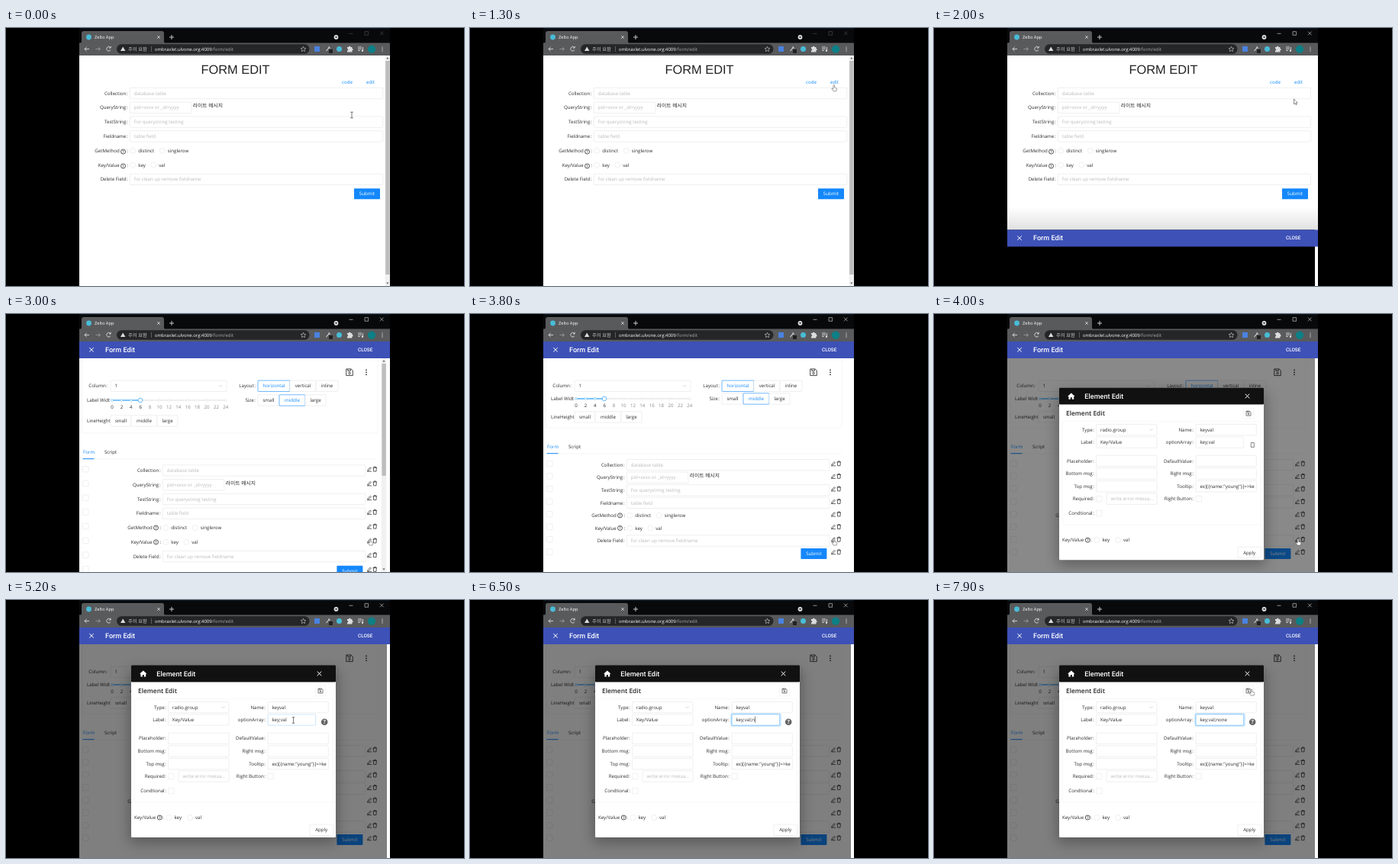
Write an HTML page that moves like this. It is 600x338 px and loops after 8 s.

```html
<!DOCTYPE html>
<html lang="en">
<head>
<meta charset="utf-8">
<title>Form editor</title>
<style>
  html, body { margin: 0; width: 100%; height: 100%; overflow: hidden; background: #000; }
  svg { display: block; width: 600px; height: 338px; }
  text { font-family: "Open Sans", "Noto Sans CJK KR", "Noto Sans CJK", sans-serif; white-space: pre; text-rendering: geometricPrecision; }
  .roboto { font-family: Roboto, sans-serif; font-weight: 500; }
  .arial { font-family: "Liberation Sans", Arial, sans-serif; }
</style>
</head>
<body>
<svg id="stage" viewBox="0 0 600 338"></svg>
<script>
const LOOP = 8000, STEP = 100;
const BLUE = '#1488fb', INK = '#2b2b2b', HINT = '#b9b9b9', EDGE = '#e4e4e4', BAR = '#3d51b7';

// Drawing helpers: y is the vertical centre of the text line.
const text = (x, y, s, { fill = INK, size = 6.15, anchor = 'start', cls = '', extra = '' } = {}) =>
  `<text x="${x}" y="${y + size * 0.355}" fill="${fill}" font-size="${size}" text-anchor="${anchor}" class="${cls}" ${extra}>${s}</text>`;
const rect = (x, y, w, h, fill, extra = '') =>
  `<rect x="${x}" y="${y}" width="${w}" height="${h}" fill="${fill}" ${extra}/>`;
const stroke = (d, color, width = 0.8, extra = '') =>
  `<path d="${d}" fill="none" stroke="${color}" stroke-width="${width}" ${extra}/>`;
const circle = (x, y, r, fill, extra = '') =>
  `<circle cx="${x}" cy="${y}" r="${r}" fill="${fill}" ${extra}/>`;
const group = (id, body, extra = '') => `<g id="${id}" ${extra}>${body}</g>`;

const box = (x1, x2, y, { id = '', edge = EDGE, h = 14.4, fill = '#fff' } = {}) =>
  `<rect ${id && `id="${id}"`} x="${x1}" y="${y - h / 2}" width="${x2 - x1}" height="${h}" rx="0.8" fill="${fill}" stroke="${edge}" stroke-width="0.6"/>`;
const input = (x1, x2, y, value = '', hint = false) =>
  box(x1, x2, y) + text(x1 + 5.5, y, value, { fill: hint ? HINT : INK });
const label = (x, y, s) => text(x, y, s + '<tspan dx="0.7">:</tspan>', { anchor: 'end' });
const radio = (x, y, s) => circle(x, y, 3.5, '#fff', `stroke="${EDGE}" stroke-width="0.6"`) + text(x + 7, y, s);
const check = (x, y) => box(x, x + 7.5, y, { h: 7.5 });
const cross = (x, y, r, color, width) =>
  stroke(`M${x - r} ${y - r}l${2 * r} ${2 * r}m0 ${-2 * r}l${-2 * r} ${2 * r}`, color, width);
const chevron = (x, y) => stroke(`M${x - 2} ${y - 1}l2 2l2 -2`, '#bbb', 0.6);
const help = (x, y) => circle(x, y, 3, 'none', `stroke="${INK}" stroke-width="0.8"`) +
  text(x, y, '?', { size: 5, anchor: 'middle', extra: 'font-weight="600"' });
const floppy = (x, y, r) => stroke(
  `M${x - r} ${y - r}h${r * 1.5}l${r * .5} ${r * .5}v${r * 1.5}h${-2 * r}zm${r * .5} 0v${r * .6}h${r * .8}v${-r * .6}`, INK, r / 5) +
  circle(x, y + r * .3, r * .3, 'none', `stroke="${INK}" stroke-width="${r / 5}"`);
const kebab = (x, y, gap, color) => [-1, 0, 1].map(i => circle(x, y + i * gap, gap * .3, color)).join('');
const pencil = (x, y) => stroke(`M${x - 2} ${y + 1}l3.2 -3.4l1.2 1.2l-3.2 3.2l-1.5 .3zM${x - 3} ${y + 3}h6`, INK, 0.7);
const trash = (x, y) => stroke(`M${x - 2.7} ${y - 1.9}h5.4M${x - 1.2} ${y - 2}v-1h2.4v1M${x - 2} ${y - 1.8}l.3 4.7h3.4l.3 -4.7`, INK, 0.75);

const buttons = (x, y, items, active) => items.map(([name, w]) => {
  const on = name === active, left = x;
  x += w;
  return box(left, x, y, { edge: on ? BLUE : EDGE }) +
    text(left + w / 2, y, name, { fill: on ? BLUE : INK, anchor: 'middle' });
}).join('');
const submit = (x, y) => rect(x, y - 7, 34, 14, BLUE, 'rx="0.8"') +
  text(x + 17, y, 'Submit', { fill: '#fff', anchor: 'middle' });
const scrollbar = (x, top, thumbTop, thumbEnd) =>
  rect(x, top, 6.5, 338 - top, '#f1f1f1') + rect(x + .7, thumbTop, 5.4, thumbEnd - thumbTop, '#bdbdbd') +
  `<path d="M${x + 1.6} ${top + 4.5}h3.4l-1.7 -2zM${x + 1.6} 333.5h3.4l-1.7 2z" fill="#555"/>`;

function formRows(x, right, top, step, iconShift) {
  const y = i => top + i * step;
  const helped = (i, s) => text(x - 13.5, y(i), s, { anchor: 'end' }) + help(x - 8.8, y(i) + iconShift) + label(x - 2.7, y(i), '');
  return [[0, 'Collection', 'database table'], [2, 'TestString', 'For querystring testing'],
    [3, 'Fieldname', 'table field'], [6, 'Delete Field', 'for clean up remove fieldname']]
    .map(([i, name, hint]) => label(x - 2.7, y(i), name) + input(x, right, y(i), hint, true)).join('') +
    label(x - 2.7, y(1), 'QueryString') + input(x, x + 80.5, y(1), 'pid=xxxx or _id=yyyy', true) +
    text(x + 82.5, y(1) - 2.5, '라이트 메시지', { size: 6.8 }) +
    helped(4, 'GetMethod') + radio(x + 4, y(4), 'distinct') + radio(x + 42.5, y(4), 'singlerow') +
    helped(5, 'Key/Value') + radio(x + 4, y(5), 'key') + radio(x + 31, y(5), 'val');
}

function browser() {
  const pale = '#dcdcdc';
  return rect(96, 0, 407, 20, '#08090b') + rect(96, 0, 407, .8, '#0c1c30') +
    `<path d="M97 20q2 0 2 -2v-11q0 -3 3 -3h102q3 0 3 3v11q0 2 2 2z" fill="#595a5b"/>` +
    rect(96, 19.5, 407, 16.5, '#595a5b') +
    circle(108.5, 12, 3.4, '#49bcd8') + text(116, 12, 'Zelto App', { fill: '#fff', size: 5.7 }) +
    cross(200, 12, 1.9, pale, .8) + stroke('M214 12h6m-3 -3v6', pale, .9) +
    circle(432.5, 12, 2.9, pale) + `<path d="M431 11.2h3l-1.5 2z" fill="#111"/>` +
    group('controls', stroke('M449.5 7.300h5M470 4.7h4.6v4.6h-4.6zM490 4.7l4.6 4.6m0 -4.6l-4.6 4.6', 'currentColor', .7)) +
    stroke('M109 27.5h-6m2.7 -2.7l-2.7 2.7l2.7 2.7', pale, .9) +
    stroke('M117.5 27.5h6m-2.7 -2.7l2.7 2.7l-2.7 2.7', '#999', .9) +
    stroke('M136.8 25.5a2.8 2.8 0 1 0 .2 3.2M137.2 23.8v2.3h-2.3', pale, .9) +
    rect(145, 21.2, 252.5, 12.6, '#252628', 'rx="6.3"') +
    `<path d="M150 30l3.2 -5.6l3.2 5.6z" fill="${pale}"/>` +
    text(160, 27.5, '주의 요함', { fill: '#ccc', size: 6.3 }) + stroke('M190.5 24v7', '#888', .6) +
    text(195, 27.5, 'ombraxlet.ulvone.org:4009<tspan fill="#aaa">/form/edit</tspan>', { fill: '#fff', size: 5.95 }) +
    stroke('M389.5 24.3l1 2.1l2.3 .3l-1.7 1.6l.4 2.3l-2 -1.1l-2 1.1l.4 -2.3l-1.7 -1.6l2.3 -.3z', pale, .6) +
    rect(404, 24, 7, 7, '#4a82e0') + stroke('M419.5 30l4 -4.5m-1 -1l2 2', pale, 1.1) +
    rect(423, 28, 5, 5, '#222') + circle(436.5, 27.5, 3.5, '#49bcd8') +
    `<path d="M447 25h2a1.2 1.2 0 0 1 2.4 0h2v2a1.2 1.2 0 0 1 0 2.4v2h-6.4v-2a1.2 1.2 0 0 0 0 -2.4z" fill="${pale}"/>` +
    stroke('M461 25h5m-5 2.2h5m-5 2.2h3m3.5 -4.4v4.5', pale, .9) + circle(467, 29.7, 1.2, pale) +
    circle(479, 27.6, 5.2, '#0d7f86') + kebab(493, 27.5, 2.4, pale);
}

const mainPage = () => rect(96, 36, 407, 302, '#fff') +
  text(300.5, 54, 'FORM EDIT', { size: 16.4, anchor: 'middle', cls: 'arial', fill: '#222' }) +
  text(440, 71.3, 'code', { fill: BLUE }) + text(472, 71.3, 'edit', { fill: BLUE }) +
  formRows(162.3, 493.7, 85.5, 18.8, 1.3) +
  box(162.3, 493.7, 85.5, { id: 'hovered', edge: '#40a9ff', fill: 'none' }) + submit(456, 217.3);

// k runs from 0 (roomy) to 1 (tight spacing).
function settings(k) {
  const slider = 113 - 2 * k, line = 140 - 5 * k, tabs = 181 - 7 * k, top = 205 - 7.3 * k, step = 18.75 - 2.2 * k;
  let s = stroke(`M100 57V${156 - 7 * k}H487V57`, '#f0f0f0', .6) +
    floppy(450, 76.3, 4.3) + kebab(472, 76.3, 3, INK) +
    label(133, 94.3, 'Column') + input(137, 289, 94.3, '1') + chevron(281, 94.3) +
    label(327, 94.3, 'Layout') + buttons(330, 94.3, [['horizontal', 42], ['vertical', 34], ['inline', 29]], 'horizontal') +
    text(106, slider, 'Label Widt') +
    rect(138, slider - 1, 150, 2, '#eee') + rect(138, slider - 1, 38, 2, '#7cc4fb');
  for (let i = 0; i <= 12; i++) {
    const x = 139 + i * 12.4;
    s += circle(x, slider, 1.5, '#fff', `stroke="${i < 4 ? '#7cc4fb' : '#e4e4e4'}" stroke-width="0.7"`) +
      text(x, slider + 8.4, i * 2, { anchor: 'middle', fill: i < 4 ? INK : '#888' });
  }
  s += circle(176, slider, 2.8, '#fff', `stroke="#69bdfa" stroke-width="1"`) +
    label(327, slider, 'Size') + buttons(330, slider, [['small', 28], ['middle', 34], ['large', 27]], 'middle') +
    text(106, line, 'LineHeight') + buttons(137, line, [['small', 27], ['middle', 34], ['large', 27]]) +
    text(101, tabs, 'Form', { fill: BLUE }) + text(129, tabs, 'Script') +
    rect(100, tabs + 8.7, 387, .6, '#eee') + rect(100.5, tabs + 8.2, 15, 1, BLUE) +
    formRows(205.3, 471, top, step, 0);
  for (let i = 0; i < 8; i++) {
    const y = top - 1.8 + i * step;
    s += check(100.5, y) + pencil(476, y) + trash(483.3, y);
  }
  return s + submit(433.4, top + 7 * step + .5) + (k ? '' : scrollbar(491.7, 58, 65, 212));
}

const drawer = () => rect(96, 36, 403, 302, '#000') + rect(499, 36, 4, 302, '#fff') +
  group('content', rect(96, 36, 407, 302, '#fff') + group('roomy', settings(0)) + group('tight', settings(1))) +
  rect(96, 57, 403, 281, '#000', 'id="backdrop"') +
  rect(96, 6, 407, 30, 'url(#shade)', 'id="rim"') + rect(96, 36, 407, 22, BAR) +
  cross(112, 46.8, 2.8, '#fff', 1) + text(130, 46.8, 'Form Edit', { fill: '#fff', size: 9.1, cls: 'roboto' }) +
  text(461, 46.6, 'CLOSE', { fill: '#fff', size: 6.4, cls: 'roboto' });

function modal() {
  const left = (y, name, value) => label(210, y, name) + input(212.5, 292, y, value);
  const right = (y, name, value) => label(340, y, name) + input(343, 422.3, y, value);
  return rect(162, 92, 272, 226, '#000', 'opacity=".3" filter="url(#blur)"') +
    rect(164, 86, 268, 225, '#fff', 'rx="1.5"') + rect(164, 85.6, 268, 21.8, '#111', 'rx="1.2"') +
    `<path d="M175 96.8l4.8 -4.4l4.8 4.4h-1.4v3.8h-2.4v-2.6h-2v2.6h-2.4v-3.8z" fill="#fff"/>` +
    text(197.3, 96.4, 'Element Edit', { fill: '#fff', size: 9.1, cls: 'roboto' }) + cross(410.5, 96.4, 2.8, '#fff', 1) +
    text(173, 119.3, 'Element Edit', { size: 8.4, fill: '#222', extra: 'font-weight="600"' }) +
    box(405, 419, 119, { h: 13.6, edge: '#eee' }) + floppy(412, 119, 3) +
    stroke('M168.500 129.500H428V265H168.500z', '#f4f4f4', .6) +
    left(140.5, 'Type', 'radio.group') + chevron(284.5, 140.5) + right(140.5, 'Name', 'keyval') +
    left(157, 'Label', 'Key/Value') + label(340, 157, 'optionArray') +
    rect(342, 148.8, 65, 16.4, 'none', 'id="glow" rx="1.5" stroke="#bfe0fd" stroke-width="1.3"') +
    box(343, 405.7, 157, { id: 'options' }) + text(348.5, 157, '', { extra: 'id="typed"' }) +
    rect(368, 152.5, .6, 8.3, '#333', 'id="caret"') +
    stroke('M415.300 157.300h4v6h-4z', '#555', .7, 'id="blank"') +
    group('badge', circle(417.2, 159.7, 4.3, '#636363') + text(417.2, 159.7, '?', { fill: '#fff', size: 7, anchor: 'middle', extra: 'font-weight="700"' })) +
    left(181.3, 'Placeholder', '') + right(181.3, 'DefaultValue', '') +
    left(198, 'Bottom msg', '') + right(198, 'Right msg', '') +
    left(214.6, 'Top msg', '') + right(214.6, 'Tooltip', 'ex)[{name:"young"}]=&gt;ke') +
    label(210, 231, 'Required') + check(212.5, 231) + input(226, 292, 231, 'write error messa...', true) +
    label(340, 231, 'Right Button') + check(343, 231) +
    label(210, 250, 'Condtional') + check(212.5, 250) +
    text(168, 285, 'Key/Value') + help(201.3, 285) + text(205, 285, ':') +
    radio(213.5, 285, 'key') + radio(241, 285, 'val') +
    box(398, 428.5, 301.3, { edge: '#e4e4e4' }) + text(413.2, 301.3, 'Apply', { anchor: 'middle' });
}

const pointer = () => group('beam', stroke('M-1.800 -3.800h3.600M0 -3.800v7.600M-1.800 3.800h3.600', '#333', .65)) +
  group('arrow', `<path d="M0 0v6.800l1.600 -1.400l1.100 2.300l1.100 -.5l-1.100 -2.200h2.100z" fill="#fff" stroke="#444" stroke-width=".6"/>`) +
  group('hand', `<path d="M-.8 .8q.8 -1.400 1.600 0v3l2.400 .6q.9 .4 .6 1.500l-.7 2.600h-3.900l-2 -3q0 -1.100 1.200 -.5l.8 .7z" fill="#fff" stroke="#444" stroke-width=".5"/>`);

document.getElementById('stage').innerHTML = `<defs>
  <clipPath id="page"><rect x="96" y="36" width="407" height="302"/></clipPath>
  <linearGradient id="shade" x2="0" y2="1"><stop stop-opacity="0"/><stop offset="1" stop-opacity=".12"/></linearGradient>
  <filter id="blur" x="-20%" y="-20%" width="140%" height="140%"><feGaussianBlur stdDeviation="9"/></filter></defs>` +
  rect(0, 0, 600, 338, '#000') + browser() +
  `<g clip-path="url(#page)">${mainPage()}${group('pageScroll', scrollbar(496.5, 36, 43, 323))}` +
  `${group('drawer', drawer())}${group('modal', modal())}</g>` + group('cursor', pointer());

const el = id => document.getElementById(id);
const show = (id, on) => el(id).setAttribute('display', on ? 'inline' : 'none');
const clamp = u => Math.min(1, Math.max(0, u));
const easeOut = u => 1 - (1 - clamp(u)) ** 3;

const path = [[0, 453, 114], [100, 453, 114], [600, 476, 86], [1100, 476, 86], [1400, 477, 70], [1700, 477, 70],
  [2000, 471.5, 93], [2100, 471.5, 93], [2800, 477, 294.5], [4500, 477, 294.5], [5200, 376.5, 157.5],
  [7500, 377, 158], [7900, 416, 116.5], [LOOP, 416, 116.5]];
const shapes = [[1200, 'beam'], [1850, 'hand'], [2850, 'arrow'], [4650, 'hand'], [5000, 'arrow'], [7700, 'beam'], [LOOP, 'hand']];
const keyTimes = [6400, 6500, 6700, 6900, 7000];

function moveCursor(t) {
  const i = path.findIndex(p => p[0] > t), [t0, x0, y0] = path[i - 1], [t1, x1, y1] = path[i];
  const u = (t - t0) / (t1 - t0), e = u * u * (3 - 2 * u);
  el('cursor').setAttribute('transform', `translate(${x0 + (x1 - x0) * e} ${y0 + (y1 - y0) * e})`);
  const active = shapes.find(s => t < s[0])[1];
  ['beam', 'arrow', 'hand'].forEach(id => show(id, id === active));
  show('cursor', t < 6400 || t >= 7600);
}

function render(t) {
  el('controls').setAttribute('color', t < 1500 ? '#4a4a4a' : '#c4c4c4');
  show('hovered', t >= 300 && t < 1200);
  show('pageScroll', t < 2000);

  const rise = easeOut((t - 1980) / 225);
  el('drawer').setAttribute('transform', `translate(0 ${302 * (1 - rise)})`);
  show('drawer', rise > 0);
  show('rim', rise < 1);
  show('content', t >= 2100);
  show('roomy', t < 3800);
  show('tight', t >= 3800);

  const pop = easeOut((t - 3832) / 260);
  el('modal').setAttribute('transform', `translate(0 ${252 * (1 - pop)})`);
  show('modal', pop > 0);
  el('backdrop').setAttribute('opacity', 0.5 * pop ** 1.8);
  show('blank', t >= 4000 && t < 4100);
  show('badge', t >= 4100);

  const focused = t >= 5500, count = keyTimes.filter(k => t >= k).length;
  el('options').setAttribute('stroke', focused ? '#40a9ff' : t >= 5100 ? '#a9d5fb' : EDGE);
  show('glow', focused);
  el('typed').textContent = 'key;val' + ';none'.slice(0, count);
  show('caret', t >= 5900 && t < 7200);
  el('caret').setAttribute('x', 348.7 + el('typed').getComputedTextLength());
  moveCursor(t);
}

function tick() {
  render(Math.floor((performance.now() % LOOP) / STEP) * STEP);
  requestAnimationFrame(tick);
}
tick();
</script>
</body>
</html>
```
